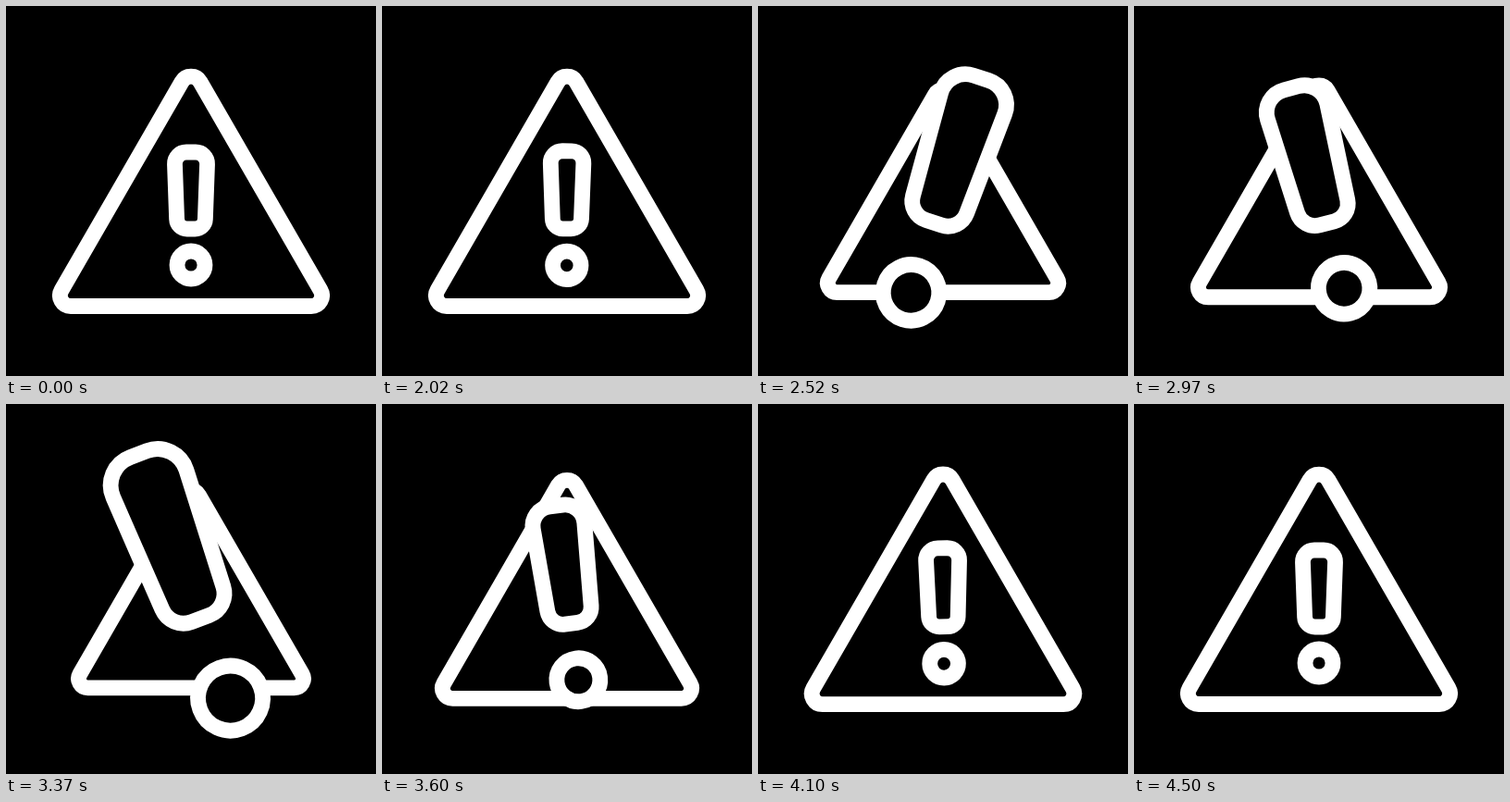
An HTML page with a canvas for the animation above (4.52 s loop, 400x400 px).

```html
<!DOCTYPE html>
<html lang="en">
<head>
<meta charset="utf-8">
<title>Alert</title>
<style>
  html, body { margin: 0; width: 100%; height: 100%; overflow: hidden; background: #000; }
  canvas { display: block; width: 400px; height: 400px; }
</style>
</head>
<body>
<canvas id="stage"></canvas>
<script>
const LOOP = 4520;
const LAG = 42; // the triangle follows the mark
const canvas = document.getElementById('stage');
const ctx = canvas.getContext('2d');
const dpr = window.devicePixelRatio || 1;
canvas.width = canvas.height = 400 * dpr;

// Sine ease in and out between the values at the given times.
function ease(t, times, values) {
  const i = times.findIndex(end => t < end);
  if (i < 0) return values[values.length - 1];
  if (i === 0) return values[0];
  const p = (t - times[i - 1]) / (times[i] - times[i - 1]);
  return values[i - 1] + (values[i] - values[i - 1]) * (1 - Math.cos(Math.PI * p)) / 2;
}

// Two pulses, one overshoot, then rest.
const beats = [2000, 2325, 2778, 3224, 3400, 3790, 4130, 4450];
const swings = [2000, 2400, 3156, 3380, 3800, 4150, 4500];
const swell = t => ease(t, beats, [0, 1, .4, 1, 1, -.1, .02, 0]);
const triScale = t => ease(t - LAG, beats, [1, .858, .944, .858, .858, 1.118, .988, 1]);
const tilt = t => ease(t, swings, [0, 20.6, -20.6, -20.6, 4, -1, 0]);

// Closed polygon with rounded corners from [x, y, radius] points.
function roundPoly(pts) {
  const n = pts.length, [a, b] = [pts[n - 1], pts[0]];
  ctx.beginPath();
  ctx.moveTo((a[0] + b[0]) / 2, (a[1] + b[1]) / 2);
  pts.forEach(([x, y, r], i) => {
    const next = pts[(i + 1) % n];
    ctx.arcTo(x, y, next[0], next[1], r);
  });
  ctx.closePath();
}

function paint() {
  ctx.fill();
  ctx.stroke();
}

function drawTriangle(s) {
  const half = 150 * s, r = 11.5 * s;
  const base = 124.5 * s, apex = base - half * Math.sqrt(3);
  roundPoly([[0, apex, r], [half, base, r], [-half, base, r]]);
  paint();
}

// The mark grows from rest (f = 0) to its full size (f = 1).
function drawMark(f) {
  const top = -42 - 119 * f, bottom = 41 - 12 * f;
  const wide = 18 + 26 * f, narrow = 15 + 19 * f;
  const rTop = 12.5 + 20 * f, rBottom = 11 + 14 * f;
  roundPoly([[-wide, top, rTop], [wide, top, rTop],
    [narrow, bottom, rBottom], [-narrow, bottom, rBottom]]);
  paint();
  ctx.beginPath();
  ctx.arc(0, 80 + 41 * f, 15 + 20 * f, 0, 2 * Math.PI);
  paint();
}

function draw(t) {
  const s = triScale(t);
  ctx.setTransform(dpr, 0, 0, dpr, 0, 0);
  ctx.fillStyle = '#000';
  ctx.strokeStyle = '#fff';
  ctx.lineWidth = 16.8;
  ctx.fillRect(0, 0, 400, 400);
  ctx.translate(200, 200);
  drawTriangle(s);
  ctx.translate(0, 34 * (1 - s));
  ctx.rotate(tilt(t) * Math.PI / 180);
  drawMark(swell(t));
}

function tick() {
  draw(performance.now() % LOOP);
  requestAnimationFrame(tick);
}
tick();
</script>
</body>
</html>
```
